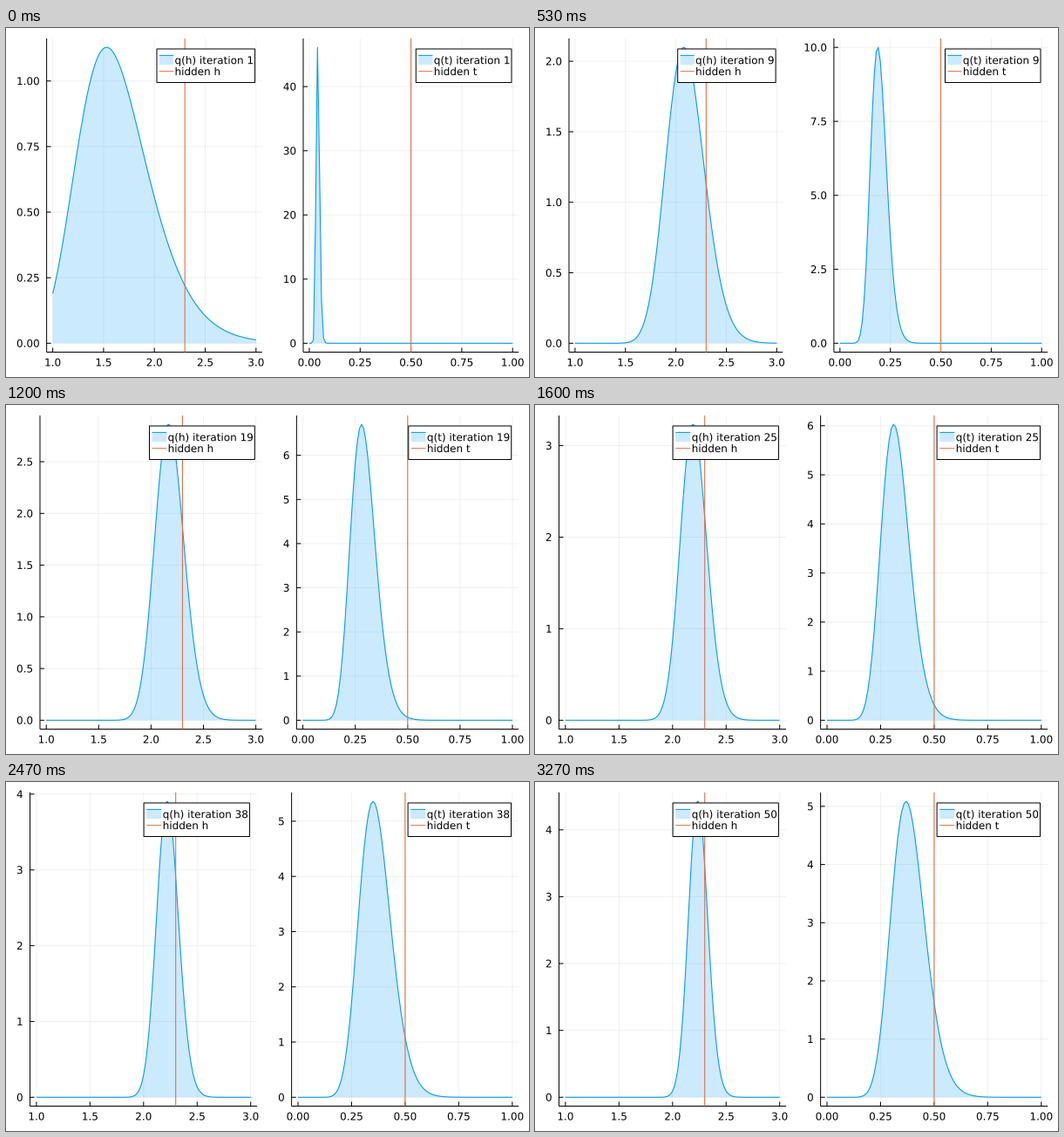
Animation, 600 px wide and 400 px high, one loop 3340 ms. Source, as a matplotlib script:

```python
import math

import matplotlib.pyplot as plt
import numpy as np
from matplotlib.animation import FuncAnimation
from matplotlib.patches import PathPatch, Polygon, Rectangle
from matplotlib.textpath import TextPath
from matplotlib.transforms import Affine2D

plt.rcParams.update({
    "font.family": "DejaVu Sans",
    "path.simplify": False,
    "path.snap": False,
})

WIDTH, HEIGHT, DPI = 600, 400, 100
PT = 72 / DPI                      # points per pixel
FONT = 12                          # text size in pixels
TOP, BOTTOM, RIGHT = 12, 371.5, 588.2
PAD = 0.03 / 1.06                  # empty margin inside each axis
LEGEND_ROW = 12.83
BLUE, ORANGE = "#009AFA", "#E36F47"
ITERATIONS, FRAMES, STEP_MS = 50, 167, 20

KEYS = [1, 9, 19, 25, 31, 38, 50]
H_PRECISION = np.array([19.7, 120.5, 242.8, 316, 389.3, 473.3, 617.6])
H_MODE = np.array([1.53, 2.078, 2.1676, 2.1905, 2.207, 2.2202, 2.2357])
T_LIMIT = 0.39
T_MODE = np.array([0.0406, 0.1872, 0.2801, 0.3113, 0.3325, 0.3502, 0.3690])
T_SHAPE = 22.3

H_GRID = np.linspace(1, 3, 201)
T_GRID = np.linspace(0, 1, 101)

fig = plt.figure(figsize=(WIDTH / DPI, HEIGHT / DPI), dpi=DPI, facecolor="white")
ax = fig.add_axes([0, 0, 1, 1])
ax.set_xlim(0, WIDTH)
ax.set_ylim(HEIGHT, 0)
ax.axis("off")
artists = []
glyphs = {}


def density_h(n):
    """Log-normal belief whose natural parameters grow steadily with n."""
    precision = np.interp(n, KEYS, H_PRECISION)
    log_mode = np.interp(n, KEYS, H_PRECISION * np.log(H_MODE)) / precision
    sigma = precision ** -0.5
    peak = math.exp(-sigma**2 / 2 - log_mode) / (sigma * math.sqrt(2 * math.pi))
    return peak * np.exp(-precision * (np.log(H_GRID) - log_mode) ** 2 / 2)


def density_t(n):
    """Gamma belief of fixed shape whose mode approaches a limit."""
    mode = T_LIMIT - math.exp(np.interp(n, KEYS, np.log(T_LIMIT - T_MODE)))
    rate = T_SHAPE / mode
    x = np.maximum(T_GRID, 1e-9)
    norm = (T_SHAPE + 1) * math.log(rate) - math.lgamma(T_SHAPE + 1)
    return np.exp(T_SHAPE * np.log(x) - rate * x + norm)


def nice_ticks(peak):
    """Values and labels of the best scored tick step for 0..peak."""
    high, span = 1.03 * peak, 1.06 * peak
    ranks = []
    for power in range(-2, 3):
        for q, nice in ((1, 1), (5, 0.9), (2, 0.7), (2.5, 0.5), (3, 0.2)):
            step = q * 10.0**power
            count = int(high / step + 1e-9) + 1
            if 4 <= count <= 8:
                grain = 1 - abs(count - 5) / 5
                score = grain / 4 + nice / 4 + 0.5 * span / ((count - 1) * step)
                ranks.append((round(score, 9), -count, step))
    _, count, step = max(ranks)
    decimals = len(f"{step:g}".partition(".")[2])
    return [(i * step, f"{i * step:.{decimals}f}") for i in range(-count)]


def number_width(label):
    dots = label.count(".")
    return FONT * (0.636 * (len(label) - dots) + 0.318 * dots)


def add(artist):
    artist.set_zorder(len(artists) + 1)
    artists.append(artist)


def line(xs, ys, color="black", width=1.0, **style):
    add(ax.plot(xs, ys, color=color, lw=width * PT,
                solid_capstyle="butt", **style)[0])


def shape(patch):
    add(ax.add_patch(patch))


def text(x, middle, label):
    """Outlined text starting at x, digits centred on middle."""
    if label not in glyphs:
        glyphs[label] = TextPath((0, 0), label, size=FONT)
    place = Affine2D().scale(1, -1).translate(x, middle + 0.365 * FONT)
    shape(PathPatch(glyphs[label], fc="black", lw=0,
                    transform=place + ax.transData))


def draw_legend(name, n, right, width):
    label = f"q({name}) iteration {n}"
    text_len = FONT * ((6.91 if name == "h" else 6.668) + 0.636 * len(str(n)))
    indent = 0.083 * width
    x1 = right - width / 30
    x0 = x1 - text_len - indent - 1.5
    y0 = TOP + (BOTTOM - TOP) / 30
    row1, row2 = y0 + LEGEND_ROW, y0 + 2 * LEGEND_ROW
    shape(Rectangle((x0, y0), x1 - x0, 3 * LEGEND_ROW,
                    fc="white", ec="black", lw=PT))
    s0, s1 = x0 + 0.012 * width, x0 + 0.0775 * width
    shape(Rectangle((s0, row1 - 5.4), s1 - s0, 10.8, fc=BLUE, alpha=0.2, lw=0))
    line([s0, s1], [row1 - 5.4] * 2, BLUE)
    line([s0, s1], [row2] * 2, ORANGE)
    text(x0 + indent, row1, label)
    text(x0 + indent, row2, f"hidden {name}")


def draw_panel(name, n, left, width, grid, values, ticks, x_ticks, hidden):
    right = left + width
    lo, hi = grid[0], grid[-1]
    height = BOTTOM - TOP

    def px(x):
        return left + width * (PAD + (x - lo) / (hi - lo) / 1.06)

    def py(y):
        return BOTTOM - height * (PAD + y / values.max() / 1.06)

    for x, _ in x_ticks:
        line([px(x)] * 2, [TOP, BOTTOM], alpha=0.06)
    for y, _ in ticks:
        line([left, right], [py(y)] * 2, alpha=0.06)

    line([left, right], [BOTTOM] * 2)
    line([left] * 2, [TOP, BOTTOM])
    for x, label in x_ticks:
        line([px(x)] * 2, [BOTTOM - 5, BOTTOM])
        text(px(x) - number_width(label) / 2, 383.1, label)
    for y, label in ticks:
        line([left, left + 5], [py(y)] * 2)
        text(left - 7.9 - number_width(label), py(y), label)

    xs, ys = px(grid), py(values)
    outline = [(xs[0], py(0)), *zip(xs, ys), (xs[-1], py(0))]
    shape(Polygon(outline, fc=BLUE, alpha=0.2, lw=0))
    line(xs, ys, BLUE, 1.1)
    line([px(hidden)] * 2, [TOP, BOTTOM], ORANGE, 1.1)
    draw_legend(name, n, right, width)


def draw(frame):
    while artists:
        artists.pop().remove()
    n = 1 + min(int((2 * frame + 1.5) * 0.15), ITERATIONS - 1)
    h, t = density_h(n), density_t(n)
    h_ticks, t_ticks = nice_ticks(h.max()), nice_ticks(t.max())

    # Both panels share the width left over by their tick labels.
    left = 19.9 + max(number_width(label) for _, label in h_ticks)
    gap = 31.9 + max(number_width(label) for _, label in t_ticks)
    width = (RIGHT - left - gap) / 2

    h_axis = [(x, f"{x:.1f}") for x in np.linspace(1, 3, 5)]
    t_axis = [(x, f"{x:.2f}") for x in np.linspace(0, 1, 5)]
    draw_panel("h", n, left, width, H_GRID, h, h_ticks, h_axis, 2.3)
    draw_panel("t", n, RIGHT - width, width, T_GRID, t, t_ticks, t_axis, 0.5)
    return artists


anim = FuncAnimation(fig, draw, frames=FRAMES, interval=STEP_MS, repeat=True)
plt.show()
```
